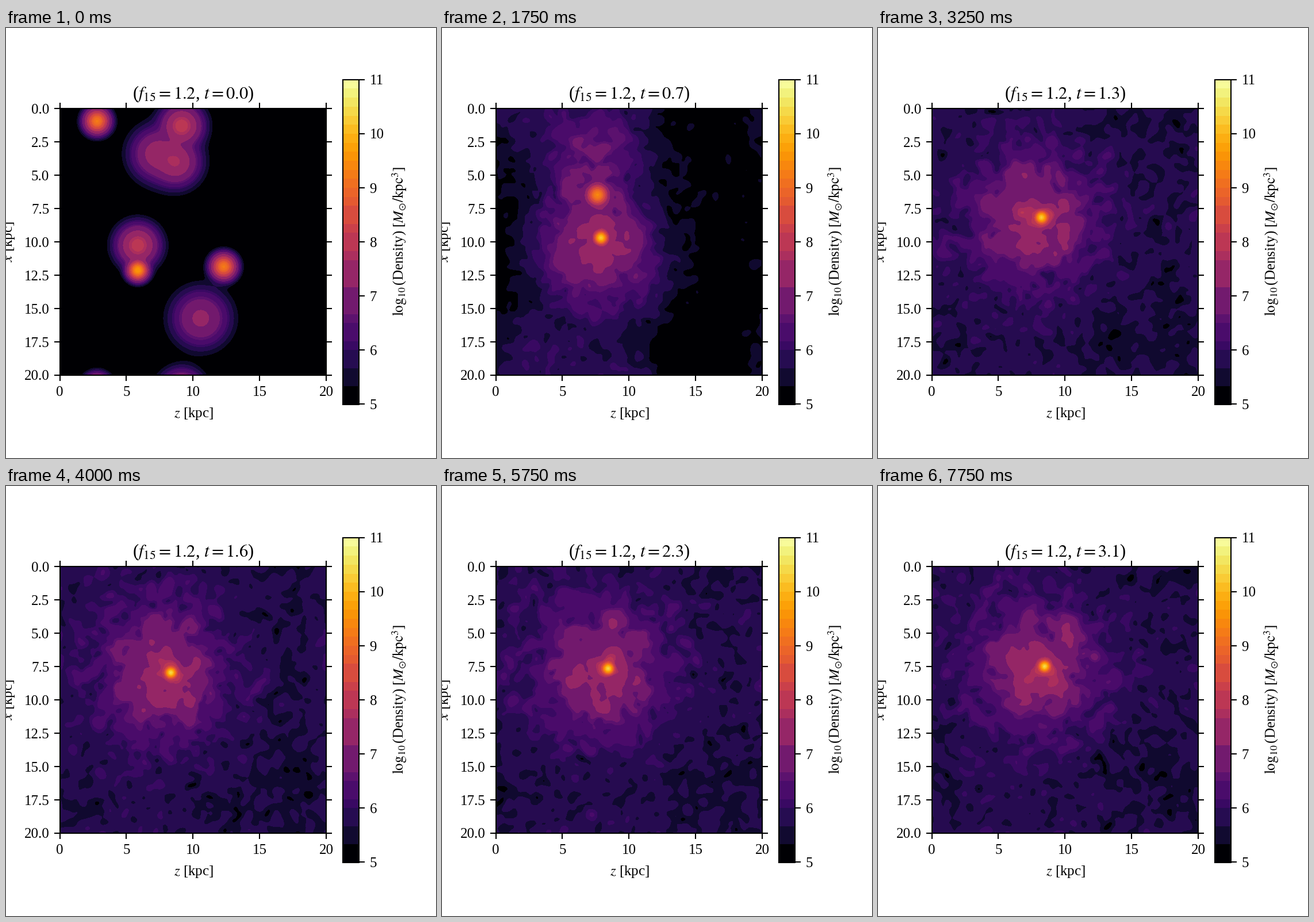
Animation of 748x748 px, one loop 8000 ms. Source, as a matplotlib script:

```python
import matplotlib.pyplot as plt
import numpy as np
from matplotlib.animation import FuncAnimation
from matplotlib.colors import BoundaryNorm, ListedColormap

plt.rcParams.update({
    "font.family": "Liberation Serif", "mathtext.fontset": "stix",
    "font.size": 18, "axes.linewidth": 1.5,
})

SIZE, DPI = 748, 100
BOX, N = 20.0, 160              # box side in kpc, grid cells per side
FRAMES, INTERVAL = 32, 250
EDGE = 5.33                     # log density where a cloud fades into black
T_PAIR, T_MERGED = 0.4, 0.9     # cores pair up, then everything is one halo

# Colour bands: the low ones span several steps of 1/6 dex.
steps = np.r_[0, 2, 4, 6, 7, 9, 10, 13, 16, 17, 19, 20, 22:37]
tones = (steps[:-1] + steps[1:]) / 72
tones[0] = 0
cmap = ListedColormap(plt.get_cmap("inferno")(tones))
norm = BoundaryNorm(5 + steps / 6, cmap.N)

cells = (np.arange(N) + 0.5) * BOX / N
Z, X = np.meshgrid(cells, cells)
TILT = (0.08 * np.cos(2 * np.pi * (Z - 6) / BOX)
        + 0.06 * np.cos(2 * np.pi * (X - 6) / BOX))

# Interfering waves, several layers deep, give the granular look.
rng = np.random.default_rng(7)
k = 2 * np.pi * np.fft.fftfreq(N, BOX / N)
K2 = k[:, None] ** 2 + k**2
waves = rng.normal(size=(5, N, N)) + 1j * rng.normal(size=(5, N, N))
waves = waves * np.exp(-K2 / (2 * 2.9**2))

# Clumps around the halo: distance, angle, radius.
clumps = np.column_stack([rng.uniform(0.8, 4.2, 12),
                          rng.uniform(0, 2 * np.pi, 12),
                          rng.uniform(0.9, 1.7, 12)])


def smooth(f):
    f = np.clip(f, 0, 1)
    return f * f * (3 - 2 * f)


def dist2(z, x):
    """Squared distance in the periodic box."""
    dz = (Z - z + BOX / 2) % BOX - BOX / 2
    dx = (X - x + BOX / 2) % BOX - BOX / 2
    return dz**2 + dx**2


def soliton(z, x, rc):
    """Soliton density; the peak grows as the core shrinks."""
    return 10**7.24 / rc**4 / (1 + 0.091 * dist2(z, x) / rc**2) ** 8


def lump(z, x, peak, radius):
    return 10 ** (peak - (peak - EDGE) * dist2(z, x) / radius**2)


# Wide solitons that dissolve early, and the clouds they leave.
start = np.log10(1e4 + sum(soliton(*s) for s in [
    (9.12, 1.3, 0.646), (7.3, 3.4, 0.861), (8.67, 4.0, 0.767),
    (5.83, 10.26, 0.646), (10.55, 15.73, 0.967)]))
clouds = np.log10(10**4.2 + sum(lump(*c) for c in [
    (7.4, 2.8, 7.8, 4.1), (8.0, 12.0, 7.65, 5.3),
    (3.6, 19.3, 6.5, 4.0), (9.0, 20.0, 6.3, 2.6), (7.2, 6.3, 5.9, 3.3)]))


def center(t):
    """Path of the merged core as it settles."""
    age = t - T_MERGED
    return np.array([8.45 - 0.47 * np.exp(-age / 0.6),
                     7.35 + 1.22 * np.exp(-age)])


def halo(t):
    """Log density of the merged halo with its orbiting clumps."""
    t = max(t, T_MERGED)
    z, x = center(t)
    rho = 10 ** (5.76 - 0.14 * np.exp((T_MERGED - t) / 0.3) + TILT)
    rho = rho + lump(z - 0.5, x + 0.3, 6.3, 8)
    rho = rho + lump(z - 0.4, x + 0.4, 7.35, 4.7) + lump(z, x, 7.9, 1.7)
    for r, angle, radius in clumps:
        a = angle + 2 * t / r
        rho = rho + lump(z - 0.3 + r * np.cos(a), x + 0.4 + r * np.sin(a),
                         7.7 - 0.25 * r, radius)
    return np.log10(rho)


def granules(t):
    psi = np.fft.ifft2(waves * np.exp(-9.8j * K2 * t))
    power = (abs(psi) ** 2).mean(axis=0)
    return np.log10(power / power.mean())


def core_place(t, begin, meet):
    """Fall from rest to a meeting point, then glide into the halo."""
    begin, meet = np.array(begin), np.array(meet)
    if t <= T_PAIR:
        return begin + (meet - begin) * (t / T_PAIR) ** 2
    if t < T_MERGED:
        f = (t - T_PAIR) / (T_MERGED - T_PAIR)
        return meet + (center(T_MERGED) - meet) * f
    return center(t)


def cores(t):
    lower, upper = (7.7, 11.38), (7.05, 3.35)
    pulse = 0.158 - 0.008 * np.cos(2 * np.pi * (t - T_MERGED) / 0.75)
    rc = 0.241 + (pulse - 0.241) * smooth(t / T_MERGED)
    rho = soliton(*core_place(t, (5.83, 12.12), lower), rc)
    if t < T_PAIR:
        rho = rho + soliton(*core_place(t, (12.27, 11.86), lower), 0.317)
    if t < T_MERGED:
        rc = 0.317 - 0.03 * smooth(t / T_PAIR)
        rho = rho + soliton(*core_place(t, (2.78, 0.95), upper), rc)
    return rho


def density(t):
    if t < T_PAIR:
        log_rho = start + (clouds - start) * smooth(t / T_PAIR)
    else:
        f = smooth((t - T_PAIR) / (T_MERGED - T_PAIR))
        log_rho = clouds + (halo(t) - clouds) * f
    log_rho = log_rho + 0.7 * smooth(t / T_MERGED) * granules(t)
    return np.clip(np.log10(10**log_rho + cores(t)), 5, 10.99)


fig = plt.figure(figsize=(SIZE / DPI, SIZE / DPI), dpi=DPI, facecolor="white")


def add_axes(left, top, width, height):
    return fig.add_axes([left / SIZE, 1 - (top + height) / SIZE,
                         width / SIZE, height / SIZE])


def label(x, y, text, rotation=0, **kw):
    return fig.text(x / SIZE, 1 - y / SIZE, text, ha="center", va="baseline",
                    rotation=rotation, rotation_mode="anchor", **kw)


ax = add_axes(93.5, 140.2, 463.8, 463.8)
image = ax.imshow(density(0), cmap=cmap, norm=norm, extent=(0, BOX, BOX, 0),
                  interpolation="bicubic", interpolation_stage="data",
                  aspect="auto")
ax.set_xticks(range(0, 21, 5))
ax.set_yticks(np.arange(0, 20.1, 2.5))
ax.yaxis.set_major_formatter("{x:.1f}")
ax.tick_params(length=7, width=1.5, pad=6.2, top=True, right=True)
ax.tick_params(axis="x", pad=6.8)

cax = add_axes(586.2, 89.8, 28.2, 564.7)
bar = fig.colorbar(image, cax=cax, ticks=range(5, 12), spacing="proportional")
bar.minorticks_off()
cax.tick_params(length=7, width=1.5, pad=6.2)

label(326, 677, "$z$ [kpc]")
label(11.5, 372, "$x$ [kpc]", 90)
label(691.5, 371, r"$\log_{10}$(Density) [$M_{\odot}/\mathrm{kpc}^3$]", 90)
title = label(326, 123.5, "", fontsize=22)


def update(i):
    t = i / 10
    image.set_data(density(t))
    title.set_text(f"($f_{{15}}=1.2$, $t={t:.1f}$)")
    return image, title


anim = FuncAnimation(fig, update, frames=FRAMES, interval=INTERVAL,
                     repeat=True, repeat_delay=0)
plt.show()
```
